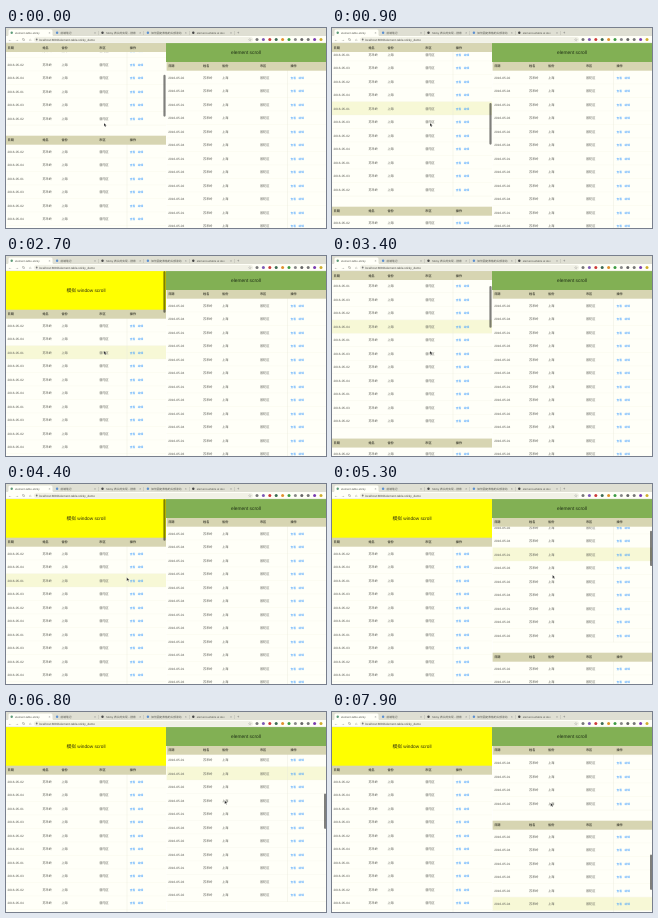
An HTML page that plays this animation: 320x200 px, repeating every 8000 ms.

```html
<!DOCTYPE html>
<html lang="zh">
<head>
<meta charset="utf-8">
<title>Sticky table headers</title>
<style>
html, body { margin: 0; width: 100%; height: 100%; overflow: hidden; background: #fff; }
svg { display: block; width: 320px; height: 200px; }
text { font-family: "Liberation Sans", "Noto Sans CJK SC", "Noto Sans CJK", sans-serif; text-rendering: geometricPrecision; white-space: pre; }
</style>
</head>
<body>
<svg id="stage" viewBox="0 0 320 200">
  <defs>
    <clipPath id="clipL"><rect x="0" y="15" width="160" height="185"/></clipPath>
    <clipPath id="clipR"><rect x="160" y="33.5" width="160" height="166.5"/></clipPath>
  </defs>
</svg>
<script>
const LOOP = 8000, ROW = 13.5, ROWS = 13, TABLES = 4, STEP = 195, HEAD = 11.3;
const HOVER_LAG = 120;
const PAPER = '#fffff8', TAN = '#d7d5b2', HOVER = '#f7f8d6', LINE = '#f2f2e4';
const INK = '#55564f', BLUE = '#409eff';
const DAYS = ['02', '04', '01', '03'];
const stage = document.getElementById('stage');

function add(parent, tag, attrs, content) {
  const el = document.createElementNS('http://www.w3.org/2000/svg', tag);
  for (const k in attrs) el.setAttribute(k, attrs[k]);
  if (content) el.textContent = content;
  parent.appendChild(el);
  return el;
}
const box = (p, x, y, width, height, fill, rx = 0) => add(p, 'rect', { x, y, width, height, fill, rx });
const dot = (p, cx, cy, r, fill) => add(p, 'circle', { cx, cy, r, fill });
// y is the vertical middle of the line
const label = (p, x, y, size, fill, s, more) =>
  add(p, 'text', { x, y: y + size * 0.36, 'font-size': size, fill, ...more }, s);
const move = (el, y) => el.setAttribute('transform', `translate(0 ${y.toFixed(2)})`);

function browserBar() {
  const g = add(stage, 'g', {});
  box(g, 0, 0, 320, 8.5, '#dfdfd3');
  box(g, 0, 8, 320, 7, '#fffff8');
  add(g, 'path', { d: 'M1 8.5Q2.5 8 2.5 6.5V3Q2.5 1.5 4 1.5H45Q46.5 1.5 46.5 3V6.5Q46.5 8 48 8.5Z', fill: '#fffff8' });
  const tabs = ['element-table-sticky', '前端笔记', 'Sticky 表头的实现 - 搜索', '如何固定表格的头部滚动', 'element-ui/table at dev'];
  const icons = ['#5d9b78', '#5b8fd0', '#4a4a4a', '#5b8fd0', '#444'];
  tabs.forEach((s, i) => {
    const x = 4.5 + i * 45.4;
    dot(g, x + 1.2, 4.8, 1.2, icons[i]);
    label(g, x + 4.6, 4.8, 2.75, '#55564f', s);
    label(g, x + 38, 4.7, 3.4, '#777', '×');
    if (i) box(g, x + 42.3, 3, 0.3, 4, '#a5a59c');
  });
  label(g, 231, 4.7, 4, '#666', '+');
  ['←', '→', '↻', '⌂'].forEach((s, i) => label(g, 2 + i * 7, 11.5, 4, '#6b6b64', s));
  box(g, 28, 9, 219, 5, '#f1f1e6', 2.5);
  dot(g, 30.7, 11.5, 0.9, '#777');
  label(g, 33, 11.5, 3, '#4b4b46', 'localhost:8080/element-table-sticky_demo');
  label(g, 242, 11.5, 3.8, '#777', '☆');
  ['#777', '#7d5ab5', '#cc3a3a', '#3d6b53', '#e0902d', '#3d9b43', '#888', '#666', '#777', '#7a3bb0', '#cfae2d']
    .forEach((c, i) => dot(g, 251 + i * 6.4, 11.5, 1.5, c));
  box(g, 0, 14.7, 320, 0.4, '#d5d5cb');
}

function cells(g, x, y, values, head) {
  const cols = [1.6, 36.4, 55.4, 93.3];
  const style = head ? { 'font-weight': 700 } : {};
  const ink = head ? '#4a4a3c' : INK;
  values.forEach((s, i) => label(g, x + cols[i], y, 3.15, ink, s, style));
  if (head) label(g, x + 123.8, y, 3.15, ink, '操作', style);
  else ['查看', '编辑'].forEach((s, i) => label(g, x + 123.8 + i * 8, y, 2.8, BLUE, s));
}

function makePanel(x, clip, top, bottom, first, stick) {
  const view = add(stage, 'g', { 'clip-path': `url(#${clip})` });
  box(view, x, top, 160, bottom - top, PAPER);
  const body = add(view, 'g', {}), rows = [], heads = [];
  for (let t = 0; t < TABLES; t++) {
    for (let k = 0; k < ROWS; k++) {
      const y = first + t * STEP + HEAD + k * ROW;
      rows.push({ y, el: box(body, x, y - ROW / 2, 160, ROW, PAPER) });
      box(body, x, y + ROW / 2 - 0.4, 160, 0.4, LINE);
      cells(body, x, y, ['2016-05-' + DAYS[k % 4], '苏禾岭', '上海', '普陀区']);
    }
    box(body, x + 120.8, first + t * STEP, 0.4, HEAD + (ROWS - 0.5) * ROW, '#e9e9da');
  }
  for (let t = 0; t < TABLES; t++) {
    const g = add(view, 'g', {});
    box(g, x, -4.5, 160, 9, TAN);
    cells(g, x, 0, ['日期', '姓名', '省份', '市区'], true);
    heads.push(g);
  }
  const size = bottom - top, total = first - 4.5 - top + TABLES * STEP;
  const thumb = box(view, x + 157.4, top, 2.2, size * size / total, 'rgba(0,0,0,.5)', 1.1);
  return {
    body,
    draw(scroll, point, bar) {
      move(body, -scroll);
      heads.forEach((h, t) => {
        const y = first + t * STEP - scroll;
        const end = y + HEAD + (ROWS - 0.5) * ROW;
        move(h, y < stick && end - stick > 8 ? stick : y);
      });
      const inside = point.x >= x && point.x < x + 160;
      for (const { y, el } of rows) {
        const hot = inside && Math.abs(y - point.y) < ROW / 2;
        el.setAttribute('fill', hot ? HOVER : PAPER);
      }
      thumb.setAttribute('y', top + scroll * size / total);
      thumb.setAttribute('opacity', bar);
    }
  };
}

// tables of [time, value]
const LEFT = [[400, 141], [850, 265], [1250, 265], [1700, 102], [2200, 0], [3100, 0], [3400, 66], [3600, 95], [4100, 0]];
const RIGHT = [[4900, 0], [5300, 60], [5600, 60], [6000, 175], [6200, 197], [6690, 197], [6800, 222.8],
  [7350, 605], [7780, 605], [7900, 510]];
const MOUSE_X = [[4050, 98], [4350, 120.5], [4450, 121], [4750, 220.5], [6000, 220.5], [6800, 218.7]];
const MOUSE_Y = [[4050, 95], [4400, 93.5], [4750, 91], [6000, 91], [6800, 88.5], [7900, 91]];
const BAR_L = [[4500, 1], [4800, 0]];
const BAR_R = [[4700, 0], [4850, 1]];

function lerp(keys, t) {
  if (t <= keys[0][0]) return keys[0][1];
  for (let i = 1; i < keys.length; i++) {
    const [a, u] = keys[i - 1], [b, v] = keys[i];
    if (t < b) return u + (v - u) * (t - a) / (b - a);
  }
  return keys[keys.length - 1][1];
}

// The hovered row trails the scroll a little.
function pointer(scroll, t) {
  const past = t - HOVER_LAG;
  return { x: lerp(MOUSE_X, past), y: lerp(MOUSE_Y, past) + 3 + lerp(scroll, past) };
}

const left = makePanel(0, 'clipL', 15, 200, 58.2, 19.5);
const right = makePanel(160.6, 'clipR', 34, 200, 38.2, 38.2);
box(left.body, 0, 15, 160, 39, '#ffff00');
label(left.body, 80, 34.3, 4.75, '#2c2c10', '模拟 window scroll', { 'text-anchor': 'middle' });
box(stage, 160, 15, 160, 19, '#82b054');
label(stage, 240, 24.6, 4.85, '#1f3016', 'element scroll', { 'text-anchor': 'middle' });
browserBar();
const mouse = add(stage, 'path', {
  d: 'M0 0V3.5L.9 2.7L1.5 4L2.1 3.7L1.5 2.5H2.6Z', fill: '#111', stroke: '#fff', 'stroke-width': 0.3
});

const start = performance.now();
function frame(now) {
  const t = Math.max(0, now - start) % LOOP;
  left.draw(lerp(LEFT, t), pointer(LEFT, t), lerp(BAR_L, t));
  right.draw(lerp(RIGHT, t), pointer(RIGHT, t), lerp(BAR_R, t));
  mouse.setAttribute('transform', `translate(${lerp(MOUSE_X, t)} ${lerp(MOUSE_Y, t)})`);
  requestAnimationFrame(frame);
}
frame(start);
</script>
</body>
</html>
```
